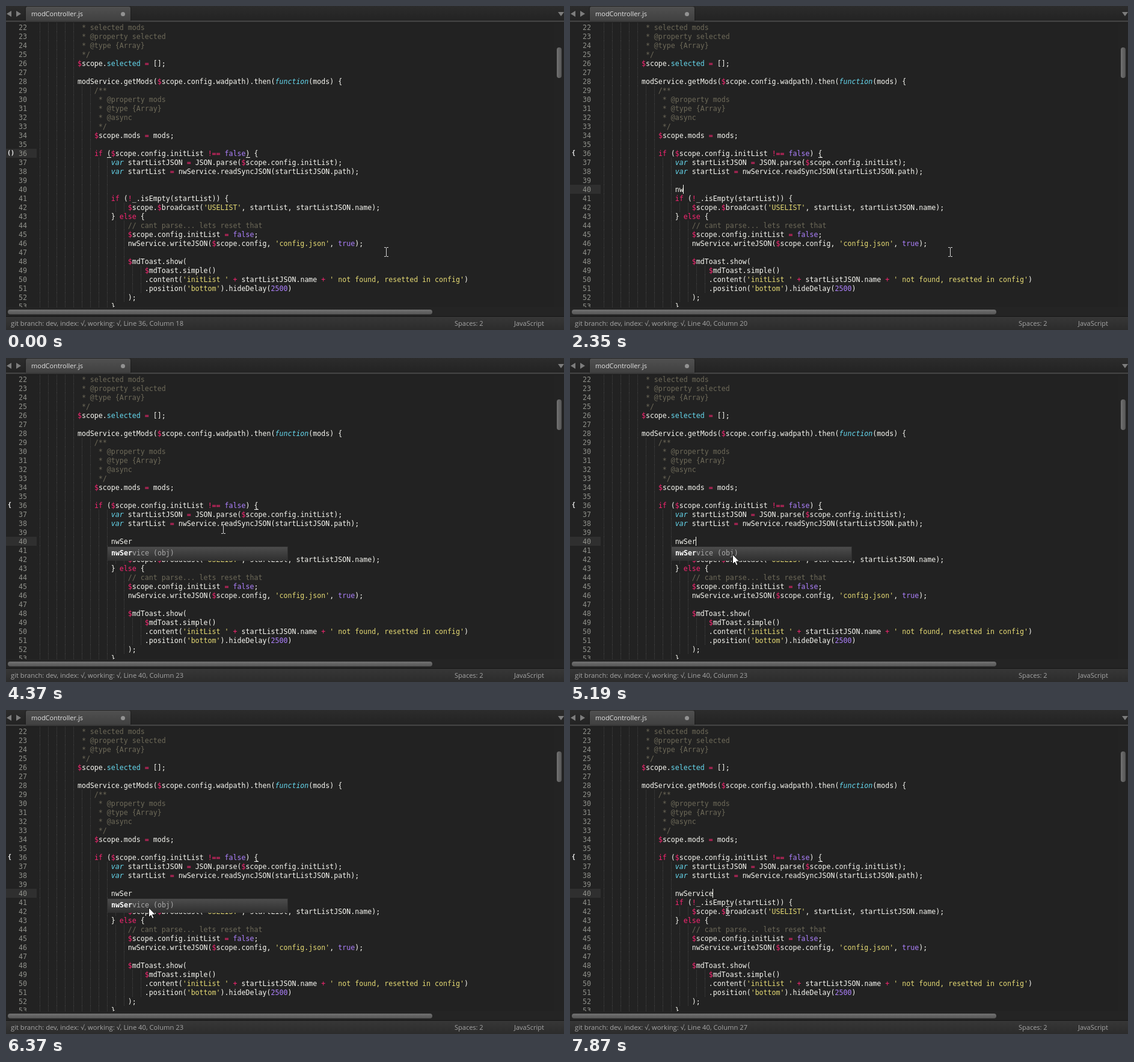
An HTML page for the animation above (8000 ms loop, 928 by 540 pixels).

```html
<!DOCTYPE html>
<html lang="en">
<head>
<meta charset="utf-8">
<title>Code editor</title>
<style>
html, body { margin: 0; width: 100%; height: 100%; overflow: hidden; background: #222; }
#stage { position: relative; width: 928px; height: 540px; overflow: hidden; background: #222; }
#stage div, #stage svg, #stage span.at { position: absolute; }
#stage svg { overflow: visible; }
#code, #popup, #icon { font: 11.628px/15px "DejaVu Sans Mono", monospace; white-space: pre; }
#code { left: 0; top: 28px; width: 912px; height: 474px; overflow: hidden; color: #f8f8f2; }
.row { left: 0; width: 912px; height: 15px; }
.num { left: 0; top: 1px; width: 35px; text-align: right; color: #8f908a; }
.text { left: 56px; top: 1px; }
.guides {
  left: 56px; height: 15px;
  background: repeating-linear-gradient(transparent 0 1px, #222 1px 2px),
    repeating-linear-gradient(90deg, #434343 0 1px, transparent 1px 14px);
}
.comment { color: #6e6a59; }
.string { color: #e6db74; }
.type { color: #66d9ef; font-style: italic; }
.support { color: #66d9ef; }
.key { color: #f92672; }
.value { color: #ae81ff; }
#active { left: 0; width: 51px; height: 15px; background: #2f2f2f; }
#caret { width: 1px; height: 15px; background: #f8f8f0; }
.mark { top: 14px; width: 7px; height: 1px; background: #f8f8f2; }
#icon { top: 237px; font-size: 10px; font-weight: bold; color: #f4f4f4; }
#popup {
  left: 168px; top: 314px; width: 301px; height: 24px; box-sizing: border-box;
  border: 1px solid #303030; background: linear-gradient(#4c4c4c, #303030);
  padding-left: 6px; line-height: 21px; color: #a8a8a8;
}
#popup b { color: #fff; }
.ui { font: 11px/16px "Open Sans", "Noto Sans", sans-serif; white-space: pre; color: #a6a6a6; }
#tabs { left: 0; top: 0; width: 928px; height: 24px; background: linear-gradient(#2c2c2c, #232323); }
#tab {
  left: 33px; top: 1px; width: 174px; height: 24px; border-radius: 3px 3px 0 0;
  background: linear-gradient(#505050, #404040); box-shadow: 0 0 2px #111;
}
#strip { left: 0; top: 24px; width: 928px; height: 3px; background: #3e3e3e; border-bottom: 1px solid #181818; }
#vtrack { left: 912px; top: 28px; width: 16px; height: 475px; background: #232323; }
#vthumb { left: 916px; top: 69px; width: 8px; height: 51px; border-radius: 4px; background: linear-gradient(90deg, #727272, #545454); }
#htrack { left: 0; top: 502px; width: 928px; height: 16px; background: #242424; }
#hthumb { left: 3px; top: 506px; width: 706px; height: 8px; border-radius: 4px; background: linear-gradient(#727272, #545454); }
#status { left: 0; top: 517px; width: 928px; height: 23px; box-sizing: border-box; border-top: 1px solid #151515; background: linear-gradient(#373737, #2c2c2c); }
#status span { top: 3px; }
#where { left: 8px; font-size: 11.200px; }
</style>
</head>
<body>
<div id="stage">
  <div id="code"><div id="active"></div></div>
  <div id="icon"></div>
  <div id="tabs"></div>
  <div id="strip"></div>
  <div id="tab"></div>
  <div class="ui" style="left:42px;top:5px;color:#e4e4e4">modController.js</div>
  <svg width="928" height="27" fill="#7d7d7d" style="left:0;top:0">
    <path d="M9 8V18L1 13ZM17 8V18L25 13ZM918 10H928L923 17Z"/>
    <circle cx="194.500" cy="13.500" r="3.500" fill="#929292"/>
  </svg>
  <div id="vtrack"></div><div id="vthumb"></div>
  <div id="htrack"></div><div id="hthumb"></div>
  <div id="status" class="ui">
    <span class="at" id="where"></span>
    <span class="at" style="left:746px">Spaces: 2</span>
    <span class="at" style="left:845px">JavaScript</span>
  </div>
  <div id="popup"><b></b><span></span></div>
  <svg id="mouse" width="1" height="1" style="left:0;top:0">
    <path id="beam" d="M-3 -7.500H0M1 -7.500H4M.5 -7V7M-3 7.500H0M1 7.500H4" fill="none" stroke="#d8d8d8"/>
    <path id="arrow" d="M.5 .5V16.500L4 13L6.500 18.500L9 17.500L6.500 12H11.500Z" fill="#fff" stroke="#111"/>
  </svg>
</div>
<script>
const FIRST = 22, LEFT = 56, CHAR = 7, LINE = 15, LOOP = 8000;
const $ = id => document.getElementById(id);

const source = `
          * selected mods
          * @property selected
          * @type {Array}
          */
         $scope.selected = [];

         modService.getMods($scope.config.wadpath).then(function(mods) {
             /**
              * @property mods
              * @type {Array}
              * @async
              */
             $scope.mods = mods;

             if ($scope.config.initList !== false) {
                 var startListJSON = JSON.parse($scope.config.initList);
                 var startList = nwService.readSyncJSON(startListJSON.path);


                 if (!_.isEmpty(startList)) {
                     $scope.$broadcast('USELIST', startList, startListJSON.name);
                 } else {
                     // cant parse... lets reset that
                     $scope.config.initList = false;
                     nwService.writeJSON($scope.config, 'config.json', true);

                     $mdToast.show(
                         $mdToast.simple()
                         .content('initList ' + startListJSON.name + ' not found, resetted in config')
                         .position('bottom').hideDelay(2500)
                     );
                 }`.split("\n").slice(1);

const syntax = new RegExp([
  "(?<comment>^ *(?:/\\*|\\*|//).*)", "(?<string>'[^']*')", "(?<type>\\b(?:var|function)\\b)",
  "(?<support>(?<=scope\\.)selected)", "(?<key>\\b(?:if|else)\\b|!==|[=+!$])",
  "(?<value>\\b(?:true|false|\\d+)\\b)"
].join("|"), "g");

function add(parent, tag, className, text = "") {
  const node = document.createElement(tag);
  node.className = className;
  node.textContent = text;
  parent.append(node);
  return node;
}

function highlight(node, code) {
  let end = 0;
  for (const match of code.matchAll(syntax)) {
    node.append(code.slice(end, match.index));
    const kind = Object.keys(match.groups).find(name => match.groups[name]);
    add(node, "span", kind, match[0]);
    end = match.index + match[0].length;
  }
  node.append(code.slice(end));
}

// Blank lines take the indent of the next line with code.
const indentAt = i => source[i] ? source[i].search(/\S/) : indentAt(i + 1);

const rows = source.map((code, i) => {
  const row = add($("code"), "div", "row");
  row.style.top = i * LINE + "px";
  add(row, "div", "num", FIRST + i);
  add(row, "div", "guides").style.width = 14 * Math.floor((indentAt(i) - 1) / 2) + 1 + "px";
  highlight(add(row, "div", "text"), code);
  return row;
});
const typed = rows[40 - FIRST].querySelector(".text");

// Underlines of the brackets around the caret, placed by the code itself.
const opener = source[36 - FIRST];
const [left, right, brace] = ["(", ")", "{"].map(bracket => {
  const mark = add(rows[36 - FIRST], "div", "mark");
  mark.style.left = LEFT + opener.indexOf(bracket) * CHAR + "px";
  return mark;
});
const caret = add($("code"), "div", "");
caret.id = "caret";

const WORD = "nwService", BLINK = 1040, TYPE = 2350, KEY = 130, ACCEPT = 7720;
const downs = [400, 560, 710, 990, 1110], up = 1510;
const letters = [0, 1, 2, 3].map(i => TYPE + i * KEY);
const presses = [-920, ...downs, up, ...letters, ACCEPT];

// Turning points of the mouse: time, x, y
const path = [
  [4000, 632, 410], [4230, 393, 269], [4770, 272, 330], [5190, 270, 327], [5430, 254, 301],
  [5670, 262, 331], [5820, 274, 328], [6100, 246, 311], [6220, 259, 330], [6640, 199, 328],
  [7420, 262, 335]
];

const passed = (times, t) => times.filter(time => time <= t).length;
const show = (node, on) => { node.style.visibility = on ? "visible" : "hidden"; };

function mouseAt(t) {
  const next = path.findIndex(point => point[0] > t);
  if (next === 0) return path[0].slice(1);
  if (next < 0) return path.at(-1).slice(1);
  const [t0, ...from] = path[next - 1], [t1, ...to] = path[next];
  return from.map((v, i) => Math.round(v + (to[i] - v) * (t - t0) / (t1 - t0)));
}

function caretOpacity(t) {
  const phase = (t - presses[passed(presses, t) - 1]) % BLINK;
  return phase < 390 ? 1 : phase < 500 ? .5 : 0;
}

function draw(t) {
  const count = passed(letters, t);
  const length = t >= ACCEPT ? WORD.length : count && count + 1;
  const line = 36 + passed(downs, t) - passed([up], t);
  const column = line === 39 ? 1 : 18 + length;
  $("active").style.top = caret.style.top = (line - FIRST) * LINE + "px";
  caret.style.left = LEFT + (column - 1) * CHAR - 1 + "px";
  caret.style.opacity = caretOpacity(t);
  $("where").textContent = `git branch: dev, index: √, working: √, Line ${line}, Column ${column}`;

  const inParens = line === 36;
  show(left, inParens);
  show(right, inParens);
  show(brace, !inParens);
  $("icon").textContent = inParens ? "()" : "{";
  $("icon").style.left = inParens ? "2px" : "3px";

  typed.textContent = " ".repeat(17) + WORD.slice(0, length);
  const matched = Math.min(length, 5), open = length > 2 && t < ACCEPT + 150;
  $("popup").firstChild.textContent = WORD.slice(0, matched);
  $("popup").lastChild.textContent = WORD.slice(matched) + " (obj)";
  show($("popup"), open);

  const [x, y] = mouseAt(t);
  const hover = open && x > 168 && x < 469 && y > 314 && y < 335;
  $("mouse").style.transform = `translate(${x}px, ${y}px)`;
  show($("arrow"), hover);
  show($("beam"), !hover);
}

const start = performance.now();
function frame() {
  draw((performance.now() - start) % LOOP);
  requestAnimationFrame(frame);
}
frame();
</script>
</body>
</html>
```
